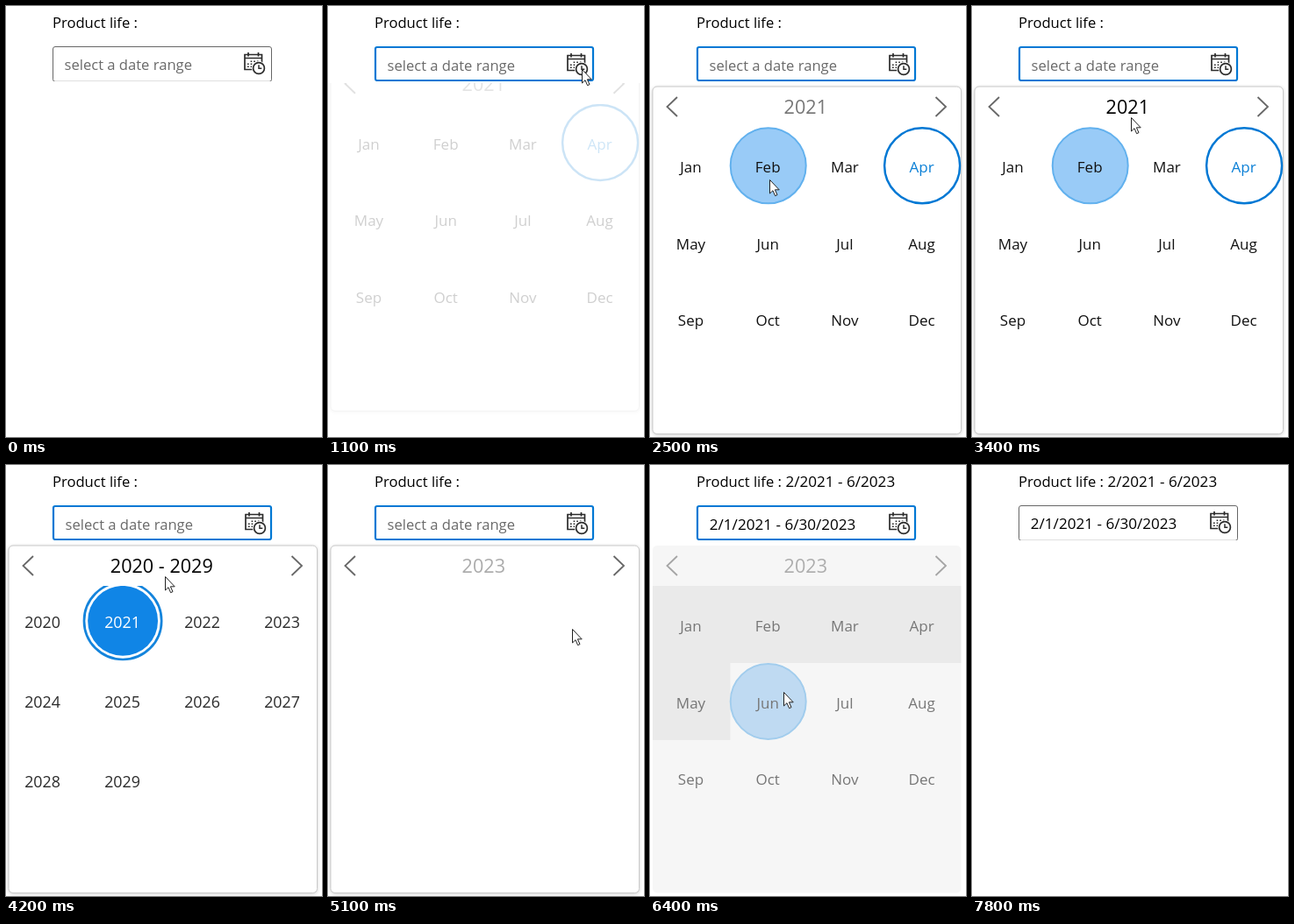
An HTML page with a canvas for the animation above (7.9 s loop, 360 by 492 pixels).

```html
<!DOCTYPE html>
<html lang="en">
<head>
<meta charset="utf-8">
<title>Date range picker</title>
<style>
html, body { margin: 0; width: 100%; height: 100%; overflow: hidden; background: #fff; }
canvas { display: block; width: 360px; height: 492px; }
</style>
</head>
<body>
<canvas id="stage"></canvas>
<script>
const W = 360, H = 492, LOOP = 7900, STEP = 100;
const BLUE = '#0078d4', GREY = '#777', INK = '#2b2b2b';
const FONT = '"Open Sans", "Noto Sans", sans-serif';
const MONTHS = 'Jan Feb Mar Apr May Jun Jul Aug Sep Oct Nov Dec'.split(' ');
const YEARS = Array.from({ length: 10 }, (_, i) => String(2020 + i));
const CELL = 87.7, RADIUS = 43;
const PANEL = { x: 3, y: 92, w: 351.5, h: 396.5 };
const ZOOM_CENTRE = [178, 300];

// Moments of interaction, in ms
const OPEN = 1100, PICK_START = 2400, TO_YEARS = 3800, TO_MONTHS = 4900, PICK_END = 6200, BLUR = 7800;

// Pointer tip: [time, x, y]
const POINTER = [
  [500, 345, 174], [800, 289, 72], [1800, 289, 72], [2200, 136, 198],
  [2700, 136, 198], [3300, 181, 127], [4200, 181, 127], [4700, 278, 187],
  [5600, 278, 187], [5900, 152, 259], [7000, 152, 259], [7500, 95, 495]
];

const canvas = document.getElementById('stage');
const ratio = window.devicePixelRatio || 1;
canvas.width = W * ratio;
canvas.height = H * ratio;
const ctx = canvas.getContext('2d');

const clamp = v => Math.max(0, Math.min(1, v));
const progress = (t, start, length) => clamp((t - start) / length);
const easeOut = p => 1 - (1 - p) ** 3;
const mix = (a, b, p) => a + (b - a) * p;
const cellCentre = i => [47 + (i % 4) * CELL, 182.3 + Math.floor(i / 4) * CELL];

function text(str, x, y, size, color, align = 'left') {
  ctx.font = `${size}px ${FONT}`;
  ctx.fillStyle = color;
  ctx.textAlign = align;
  ctx.fillText(str, x, y);
}

function clipRect(x, y, w, h) {
  ctx.beginPath();
  ctx.rect(x, y, w, h);
  ctx.clip();
}

function circle(x, y, r, fill, stroke, width = 2) {
  ctx.beginPath();
  ctx.arc(x, y, r, 0, Math.PI * 2);
  paint(fill, stroke, width);
}

function roundRect(x, y, w, h, r, fill, stroke, width = 1) {
  ctx.beginPath();
  ctx.roundRect(x, y, w, h, r);
  paint(fill, stroke, width);
}

function paint(fill, stroke, width) {
  if (fill) { ctx.fillStyle = fill; ctx.fill(); }
  if (stroke) { ctx.strokeStyle = stroke; ctx.lineWidth = width; ctx.stroke(); }
}

function path(d, fill, stroke, width) {
  const shape = new Path2D(d);
  if (fill) { ctx.fillStyle = fill; ctx.fill(shape); }
  if (stroke) { ctx.strokeStyle = stroke; ctx.lineWidth = width; ctx.stroke(shape); }
}

function calendarIcon(x, y) {
  ctx.save();
  ctx.translate(x, y);
  path('M1 2.5H20.5V19.5H1Z M1 6.5H20.5 M5 0V4.5 M16.5 0V4.5', null, INK, 1.7);
  ctx.fillStyle = INK;
  for (let row = 0; row < 3; row++)
    for (let col = 0; col < 4; col++)
      if (row || col) ctx.fillRect(4 + col * 3.6, 9.5 + row * 3, 1.7, 1.5);
  circle(17, 18, 8, '#fff');
  circle(17, 18, 6.4, '#fff', INK, 1.7);
  path('M17 14.2V18.2H20.3', null, INK, 1.5);
  ctx.restore();
}

function field(t) {
  const focused = t >= OPEN && t < BLUR, done = t >= PICK_END, shift = focused ? 1 : 0;
  text('Product life :', 53, 25, 16.6, '#000');
  if (done) text('2/2021 - 6/2023', 154.5, 25, 17.1, '#000');
  ctx.save();
  clipRect(0, 0, W, 86);
  if (focused) roundRect(54, 47, 248, 38, 2, '#fff', BLUE, 2.2);
  else roundRect(53.5, 46.5, 249, 39.8, 2.5, '#fff', '#666');
  ctx.restore();
  if (t >= 700 && t < OPEN) roundRect(264, 48, 37, 36, 2, '#f3f3f3');
  if (done) text('2/1/2021 - 6/30/2023', 66.8 + shift, 72.5 + shift, 17.1, '#000');
  else text('select a date range', 66.5 + shift, 72.5 + shift, 16.6, '#6a6a6a');
  calendarIcon(271 + shift, 53 + shift);
}

function view(labels, { scale = 1, alpha = 1, drawMarks, color = '#111', size = 17, special = {} }) {
  if (alpha <= 0) return;
  ctx.save();
  clipRect(PANEL.x, 138, PANEL.w, 350);
  ctx.globalAlpha = alpha;
  ctx.translate(...ZOOM_CENTRE);
  ctx.scale(scale, scale);
  ctx.translate(-ZOOM_CENTRE[0], -ZOOM_CENTRE[1]);
  drawMarks();
  labels.forEach((label, i) => {
    const [x, y] = cellCentre(i);
    text(label, x - 0.5, y + 7.6, size, special[i] || color, 'center');
  });
  ctx.restore();
}

const hoverMark = i => circle(...cellCentre(i), RADIUS, null, '#c8c8c8', 2);
const selectedMark = i => circle(...cellCentre(i), RADIUS, '#99cbf7', '#62b1ee', 2);

function firstMonths(t, zoom) {
  view(MONTHS, {
    ...zoom,
    special: { 3: '#0a7fd6' },
    drawMarks() {
      if (t >= PICK_START) selectedMark(1);
      else if (t >= 2100) hoverMark(1);
      circle(...cellCentre(3), RADIUS, null, BLUE, 2.5);
    }
  });
}

function years(t, zoom) {
  view(YEARS, {
    ...zoom, color: INK, size: 17.2,
    special: { 1: '#fff' },
    drawMarks() {
      const [x, y] = cellCentre(1);
      circle(x, y, 42.5, '#fff', '#1484dc', 2.6);
      circle(x, y, 38.5, '#1085e6');
      if (t >= 4600) hoverMark(3);
    }
  });
}

function lastMonths(t, zoom) {
  view(MONTHS, {
    ...zoom,
    drawMarks() {
      if (t >= PICK_END) {
        ctx.fillStyle = '#e8e8e8';
        ctx.fillRect(3, 138, 352, 88);
        ctx.fillRect(3, 226, 88.5, 88);
        selectedMark(5);
      } else if (t >= 5800) hoverMark(5);
    }
  });
}

// Zoom states for a view leaving or arriving after a header or cell click
const leaving = (t, start, endScale) => ({
  scale: mix(1, endScale, progress(t, start, 200)),
  alpha: 1 - progress(t, start, 200)
});
const arriving = (t, start, fromScale) => ({
  scale: mix(fromScale, 1, easeOut(progress(t, start + 100, 600))),
  alpha: progress(t, start + 200, 200)
});

function header(t) {
  const inYears = t >= TO_YEARS && t < TO_MONTHS;
  const title = t < TO_YEARS ? '2021' : inYears ? '2020 - 2029' : '2023';
  const hovered = t >= 3200 && t < 4400;
  ctx.globalAlpha = t < TO_MONTHS ? 1 : mix(0.1, 1, progress(t, TO_MONTHS, 350));
  text(title, 177.3, 122.8, 21.6, hovered ? '#000' : GREY, 'center');
  ctx.globalAlpha = 1;
  path('M31 104L19.5 115L31 126 M325.5 104L337 115L325.5 126', null, '#686868', 1.8);
}

function popup(t) {
  if (t < OPEN || t >= 6500) return;
  const slide = mix(-36, 0, easeOut(progress(t, OPEN - 50, 500)));
  const fading = t > PICK_END;
  const alpha = fading ? 1 - progress(t, PICK_END, 300) ** 2 : progress(t, OPEN - 50, 250);

  ctx.save();
  clipRect(0, 88, W, H);
  ctx.translate(0, slide);
  if (!fading) {
    ctx.shadowColor = 'rgba(0,0,0,.22)';
    ctx.shadowBlur = 4 * ratio;
    ctx.shadowOffsetY = ratio;
  }
  roundRect(PANEL.x, PANEL.y, PANEL.w, PANEL.h, 5, '#fff');
  ctx.shadowColor = 'transparent';
  if (!fading) roundRect(PANEL.x, PANEL.y, PANEL.w, PANEL.h, 5, null, '#c9c9c9');

  header(t);
  if (t < TO_YEARS) firstMonths(t, {});
  else if (t < TO_MONTHS) {
    firstMonths(t, leaving(t, TO_YEARS, 0.85));
    years(t, arriving(t, TO_YEARS, 1.3));
  } else {
    years(t, leaving(t, TO_MONTHS, 1.2));
    lastMonths(t, arriving(t, TO_MONTHS, 0.82));
  }

  // A veil over the panel produces the fade against the white page
  ctx.fillStyle = `rgba(255,255,255,${1 - alpha})`;
  ctx.fillRect(0, 86, W, H);
  if (fading) roundRect(PANEL.x, PANEL.y, PANEL.w, PANEL.h, 5, 'rgba(0,0,0,.036)');
  ctx.restore();
}

function pointer(t) {
  const next = POINTER.findIndex(key => key[0] > t);
  if (next < 1) return;
  const [t0, x0, y0] = POINTER[next - 1], [t1, x1, y1] = POINTER[next];
  const p = (t - t0) / (t1 - t0);
  ctx.save();
  ctx.translate(mix(x0, x1, p), mix(y0, y1, p));
  path('M.5.5V16L4 12.7L6.6 18.7L9 17.6L6.4 11.8H11.2Z', '#fff', '#222', 1);
  ctx.restore();
}

function draw(now) {
  const t = Math.floor((now % LOOP) / STEP) * STEP;
  ctx.setTransform(ratio, 0, 0, ratio, 0, 0);
  ctx.fillStyle = '#fff';
  ctx.fillRect(0, 0, W, H);
  field(t);
  popup(t);
  pointer(t);
  requestAnimationFrame(draw);
}
requestAnimationFrame(draw);
</script>
</body>
</html>
```
